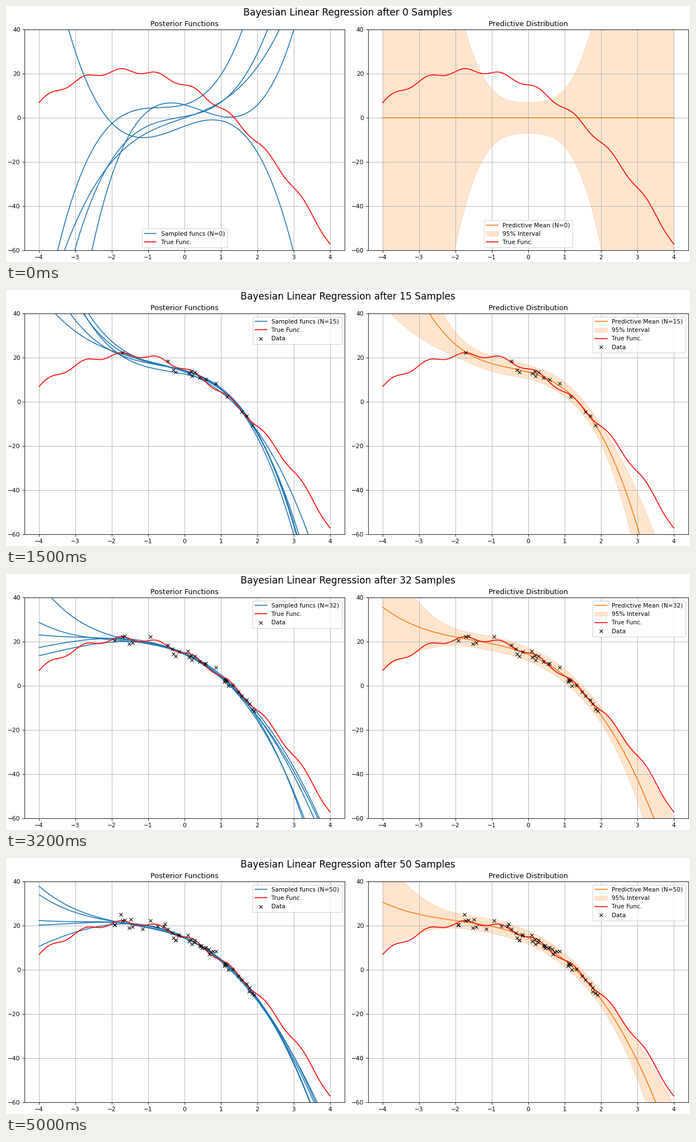
A matplotlib script that plays this animation: 1222x458 px, repeating every 5.1 s.

```python
import numpy as np
import matplotlib.pyplot as plt
from matplotlib.animation import FuncAnimation

W, H, DPI = 1222, 458, 76.375
AXES_TOP = 42.3  # pixels below the upper edge
COUNT, CURVES, FRAME_MS = 50, 5, 100
PRIOR_VAR, NOISE = 10, 1.5

xs = np.linspace(-4, 4, 200)


def true_func(x):
    return 15 - 8 * x - 2.5 * x**2 + np.sin(2 * np.pi * x)


def features(x):
    return np.vander(x, 4, increasing=True)


def posterior(n):
    """Mean and covariance of the cubic's weights after n samples."""
    phi = features(data_x[:n])
    cov = np.linalg.inv(np.eye(4) / PRIOR_VAR + phi.T @ phi / NOISE**2)
    return cov @ phi.T @ data_y[:n] / NOISE**2, cov


rng = np.random.RandomState(0)
data_x = rng.uniform(-2, 2, COUNT)
data_y = true_func(data_x) + NOISE * rng.randn(COUNT)
grid_phi = features(xs)
true_y = true_func(xs)

models = [posterior(n) for n in range(COUNT + 1)]
weights = [rng.multivariate_normal(mean, cov, CURVES) for mean, cov in models]

fig, (ax_fun, ax_pred) = plt.subplots(
    1, 2, figsize=(W / DPI, (H + 1e-6) / DPI), dpi=DPI, layout="constrained")
heading = fig.suptitle(" ", fontsize=16)


def finish(ax, n, title, loc):
    ax.plot(xs, true_y, color="red", label="True Func.")
    if n:
        ax.plot(data_x[:n], data_y[:n], "kx", label="Data")
    ax.set_title(title)
    ax.set_xlim(-4.4, 4.4)
    ax.set_ylim(-60, 40)
    ax.grid(True)
    ax.legend(loc=loc)


def draw_functions(n):
    ax_fun.clear()
    lines = ax_fun.plot(xs, grid_phi @ weights[n].T, color="tab:blue")
    lines[0].set_label(f"Sampled funcs (N={n})")
    loc = "lower center" if n == 0 else "center left" if n < 9 else "upper right"
    finish(ax_fun, n, "Posterior Functions", loc)


def draw_prediction(n):
    mean, cov = models[n]
    mid = grid_phi @ mean
    std = np.sqrt(np.sum(grid_phi @ cov * grid_phi, axis=1) + NOISE**2)
    ax_pred.clear()
    ax_pred.plot(xs, mid, color="tab:orange", label=f"Predictive Mean (N={n})")
    ax_pred.fill_between(xs, mid - 2 * std, mid + 2 * std, color="tab:orange",
                         alpha=0.2, label="95% Interval")
    loc = "lower center" if n < 9 else "upper right"
    finish(ax_pred, n, "Predictive Distribution", loc)


def draw(n):
    heading.set_text(f"Bayesian Linear Regression after {n} Samples")
    draw_functions(n)
    draw_prediction(n)
    return []


# Settle the layout once, then keep it fixed
draw(0)
fig.canvas.draw()
fig.set_layout_engine("none")
for ax in (ax_fun, ax_pred):
    box = ax.get_position()
    ax.set_position([box.x0, box.y0, box.width, 1 - AXES_TOP / H - box.y0])

anim = FuncAnimation(fig, draw, frames=COUNT + 1, interval=FRAME_MS, repeat=True)
plt.show()
```
